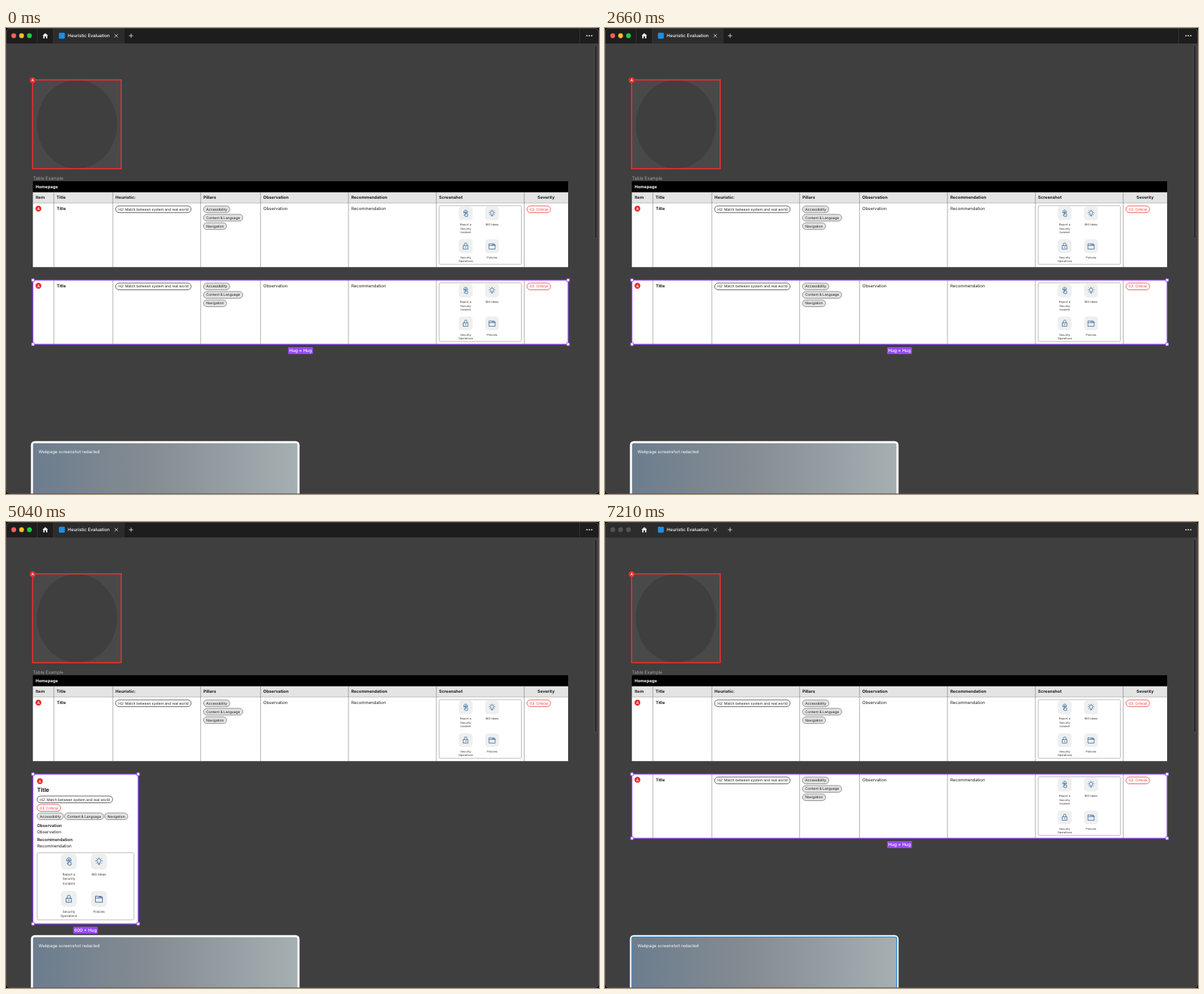
An HTML page for the animation above (7280 ms loop, 845 by 663 pixels).

```html
<!DOCTYPE html>
<html lang="en">
<head>
<meta charset="utf-8">
<title>Heuristic Evaluation</title>
<style>
html, body { margin: 0; width: 100%; height: 100%; overflow: hidden; background: #141414; }
svg { display: block; width: 845px; height: 663px; }
text { font-family: Inter, sans-serif; text-rendering: geometricPrecision; white-space: pre; }
</style>
</head>
<body>
<svg id="stage" viewBox="0 0 845 663"></svg>
<script>
const LOOP = 7280;
const RED = '#e5302f', PURPLE = '#9747ff', INK = '#1c1c1c', CANVAS = '#3f3f3f';
const COLUMNS = [38.3, 68.2, 152.2, 277.3, 362.7, 488, 613.2, 738.4];
const HEADERS = ['Item', 'Title', 'Heuristic:', 'Pillars', 'Observation', 'Recommendation', 'Screenshot'];
const RIGHT = 801, ROW_GAP = 109.8;

// Visible spans of the changing layers, in ms
const SPANS = {
  card: [[1330, 2660], [4130, 5670]],
  row: [[0, 1330], [2660, 4130], [5670, LOOP]],
  hover: [[7070, LOOP]],
  inactive: [[7140, LOOP]],
};

const rect = (x, y, w, h, fill, extra = '') =>
  `<rect x="${x}" y="${y}" width="${w}" height="${h}" fill="${fill}" ${extra}/>`;
const circle = (x, y, r, fill) => `<circle cx="${x}" cy="${y}" r="${r}" fill="${fill}"/>`;
const path = (d, stroke, width = 0.7) =>
  `<path d="${d}" fill="none" stroke="${stroke}" stroke-width="${width}" stroke-linecap="round" stroke-linejoin="round"/>`;
const group = (content, extra) => `<g ${extra}>${content}</g>`;

// y is the middle of the capital letters
const label = (x, y, text, { size = 6, weight = 400, fill = INK, anchor = 'start' } = {}) =>
  `<text x="${x}" y="${y + size * 0.36}" font-size="${size}" font-weight="${weight}" fill="${fill}" text-anchor="${anchor}">${text}</text>`;

function pill(x, y, w, text, fill, stroke, color = INK) {
  return rect(x, y, w, 9.6, fill, `rx="4.8" stroke="${stroke}" stroke-width=".75"`) +
    label(x + w / 2, y + 4.8, text, { size: 5, fill: color, anchor: 'middle' });
}
const heuristic = (x, y) => pill(x, y, 107.6, 'H2: Match between system and real world', '#fff', '#333');
const critical = (x, y) => pill(x, y, 33.6, '03: Critical', '#fff', RED, RED);
const pillar = (x, y, w, text) => pill(x, y, w, text, '#e2e2e2', '#777');

const badge = (x, y) => circle(x, y, 4.2, RED) +
  label(x, y, 'A', { size: 5, weight: 600, fill: '#fff', anchor: 'middle' });

const ICONS = [
  'M-2.6 -.6A2.9 2.9 0 1 1 2.6 -.6M-1.4 -.8A1.5 1.5 0 1 1 1.4 -.8M-.6 2V-1.6Q0 -2.4 .6 -1.6V.6L2.6 1Q3.3 1.2 3.1 2L2.6 4.3H-.6L-2.3 2.2Q-1.8 1.2 -.6 2',
  'M-1 2.2Q-1 1.2 -1.7 .4A2.3 2.3 0 1 1 1.7 .4Q1 1.2 1 2.2ZM-.8 3.5H.8M0 -4.8V-4M-4.2 -1H-3.5M3.5 -1H4.2M-3.2 -4L-2.7 -3.5M3.2 -4L2.7 -3.5M-3.2 2L-2.7 1.5M3.2 2L2.7 1.5',
  'M-3.2 -.8H3.2V4.2H-3.2ZM-1.9 -.8V-2.7A1.9 1.9 0 0 1 1.9 -2.7V-.8M0 1V2.3',
  'M-4.4 3.8V-3.4H-1.2L-.3 -2.2H4.4V3.8ZM-4.4 -1.1H4.4M3 -2.2V-3.3H0',
];

// Contents of the screenshot, measured from the top middle of its box
function tiles() {
  const items = [
    [-20.8, 11, ['Report a', 'Security', 'Incident']],
    [16.8, 11, ['BIG Ideas']],
    [-20.8, 57.6, ['Security', 'Operations']],
    [16.8, 57.6, ['Policies']],
  ];
  return items.map(([x, y, lines], i) =>
    rect(x - 9.9, y - 9.8, 19.8, 19.6, '#eeeff0', 'rx="4.5"') +
    group(path(ICONS[i], '#356a9a', 0.8), `transform="translate(${x} ${y})"`) +
    lines.map((line, n) =>
      label(x, y + 15.9 + n * 5.6, line, { size: 4, fill: '#333', anchor: 'middle' })).join('')
  ).join('');
}

function screenshot(x, y, w, h, scale) {
  return rect(x, y, w, h, '#fff', 'rx="1.6" stroke="#aaa" stroke-width=".8"') +
    group(tiles(), `transform="translate(${x + w / 2} ${y}) scale(${scale})"`);
}

function tableRow() {
  const dividers = COLUMNS.slice(1).map(x => path(`M${x} 249V340`, '#777', 0.6)).join('');
  return rect(38.3, 249, RIGHT - 38.3, 91.2, '#fff') + dividers +
    badge(46.2, 257) +
    label(72.2, 256.7, 'Title', { weight: 700 }) +
    heuristic(156.2, 253.1) +
    pillar(281.4, 253.1, 37.6, 'Accessibility') +
    pillar(281.4, 265.1, 56, 'Content &amp; Language') +
    pillar(281.4, 277.1, 33, 'Navigation') +
    label(366.8, 256.7, 'Observation') +
    label(492, 256.7, 'Recommendation') +
    screenshot(617.2, 252.8, 117.2, 83.4, 1) +
    critical(742.4, 253.1);
}

function table() {
  const header = HEADERS.map((text, i) =>
    label(COLUMNS[i] + 3.9, 241.1, text, { weight: 700 })).join('');
  const dividers = COLUMNS.slice(1).map(x => path(`M${x} 234V249`, '#777', 0.6)).join('');
  return label(38.4, 213.4, 'Table Example', { size: 6.3, fill: '#a3a3a3' }) +
    rect(38.3, 218, RIGHT - 38.3, 16, '#000') +
    label(42.2, 225.7, 'Homepage', { weight: 700, fill: '#fff' }) +
    rect(38.3, 233.7, RIGHT - 38.3, 15.5, '#e4e4e4') + header + dividers +
    label(769.5, 241.1, 'Severity', { weight: 700, anchor: 'middle' }) +
    tableRow() + path(`M38.5 249H${RIGHT}`, '#888', 0.5);
}

function selection(x, y, w, h, tagWidth, text, radius = 0) {
  const middle = x + w / 2;
  const corners = [[x, y], [x + w, y], [x, y + h], [x + w, y + h]];
  return rect(x, y, w, h, 'none', `rx="${radius}" stroke="${PURPLE}" stroke-width="1.2"`) +
    corners.map(([cx, cy]) =>
      rect(cx - 2, cy - 2, 4, 4, '#fff', `stroke="${PURPLE}" stroke-width=".8"`)).join('') +
    rect(middle - tagWidth / 2, y + h + 3.9, tagWidth, 10, PURPLE, 'rx="1.2"') +
    label(middle, y + h + 9, text, { size: 6.3, weight: 500, fill: '#fff', anchor: 'middle' });
}

function card() {
  return rect(38.3, 358.8, 150, 213, '#fff', 'rx="4"') +
    badge(48.3, 368.8) +
    label(44.2, 381.2, 'Title', { size: 8, weight: 700 }) +
    heuristic(44.3, 389.9) + critical(44.3, 401.9) +
    pillar(44.3, 413.9, 37.6, 'Accessibility') +
    pillar(83.4, 413.9, 55.8, 'Content &amp; Language') +
    pillar(140.6, 413.9, 33, 'Navigation') +
    label(44.2, 431.4, 'Observation', { weight: 600 }) +
    label(44.2, 440.6, 'Observation') +
    label(44.2, 451.8, 'Recommendation', { weight: 600 }) +
    label(44.2, 461, 'Recommendation') +
    screenshot(44.3, 470.6, 138, 95.4, 1.14) +
    selection(38.3, 358.8, 150, 213, 35, '600 × Hug', 3);
}

function marker() {
  return rect(37.8, 73.8, 126.4, 126.4, '#494949') +
    `<ellipse cx="101" cy="137" rx="57" ry="63" fill="${CANVAS}"/>` +
    rect(37.8, 73.8, 126.4, 126.4, 'none', `stroke="${RED}" stroke-width="1.7"`) +
    badge(38, 74.2);
}

const webpage = () =>
  rect(37, 589.2, 379.8, 90, 'url(#haze)', 'rx="4" stroke="#fff" stroke-width="3"') +
  label(46.3, 602.6, 'Webpage screenshot redacted', { fill: '#fff' });

const lights = colors => colors.map((color, i) => circle(11 + i * 11.2, 11, 3.4, color)).join('');

function titleBar() {
  return rect(0, 0, 845, 22, '#1d1d1d') + rect(67.5, 0, 101.5, 22, '#2c2c2c') +
    path('M44.5 0V22M67.5 0V22M817.5 0V22', '#383838', 0.8) +
    lights(['#ff5f57', '#febc2e', '#28c840']) +
    group(rect(0, 0, 845, 22, '#2c2c2c') + lights(['#535353', '#535353', '#535353']), 'id="inactive"') +
    '<path d="M52 10.8L56 7.2L60 10.8H59V14.8H57V12H55V14.8H53V10.8Z" fill="#e6e6e6"/>' +
    rect(75.4, 6.8, 8.4, 8.4, '#1b8fe8', 'rx="1.4"') +
    label(88, 11, 'Heuristic Evaluation', { size: 6.3, weight: 500, fill: '#fff' }) +
    path('M155 8.9L159.2 13.1M159.2 8.9L155 13.1M175.5 11H180.9M178.2 8.3V13.7', '#e6e6e6', 0.8) +
    [827.8, 831.2, 834.6].map(x => circle(x, 11, 1, '#e6e6e6')).join('');
}

const stage = document.getElementById('stage');
stage.innerHTML = `<defs>
    <linearGradient id="haze">
      <stop offset="0" stop-color="#6c7d8e"/><stop offset=".45" stop-color="#858c92"/>
      <stop offset=".75" stop-color="#969fa3"/><stop offset="1" stop-color="#a6afb2"/>
    </linearGradient>
    <clipPath id="window">${rect(0, 0, 845, 663, '#000', 'rx="6"')}</clipPath>
  </defs>` +
  group(
    rect(0, 0, 845, 663, CANVAS) + marker() + table() +
    group(
      group(tableRow(), `transform="translate(0 ${ROW_GAP})"`) +
      selection(38.3, 358.8, RIGHT - 38.3, 91.2, 35.4, 'Hug × Hug'), 'id="row"') +
    group(card(), 'id="card"') +
    webpage() +
    group(rect(38.2, 590.4, 377.4, 90, 'none', 'rx="2.5" stroke="#2c8ce0" stroke-width="1.4"'), 'id="hover"') +
    rect(838.4, 24.5, 3.8, 275, '#2b2b2b', 'rx="1.9" stroke="#606060" stroke-width=".6"') +
    titleBar(), 'clip-path="url(#window)"') +
  rect(0.5, 0.5, 844, 662, 'none', 'rx="6" stroke="#555" stroke-width=".7"');

function play(id, spans) {
  const frame = (time, opacity) => ({ offset: time / LOOP, opacity, easing: 'step-end' });
  const frames = spans.flatMap(([from, to]) => [frame(from, 1), frame(to, to === LOOP ? 1 : 0)]);
  if (spans[0][0] > 0) frames.unshift(frame(0, 0));
  if (spans.at(-1)[1] < LOOP) frames.push(frame(LOOP, 0));
  document.getElementById(id).animate(frames, { duration: LOOP, iterations: Infinity });
}
Object.entries(SPANS).forEach(([id, spans]) => play(id, spans));
</script>
</body>
</html>
```
